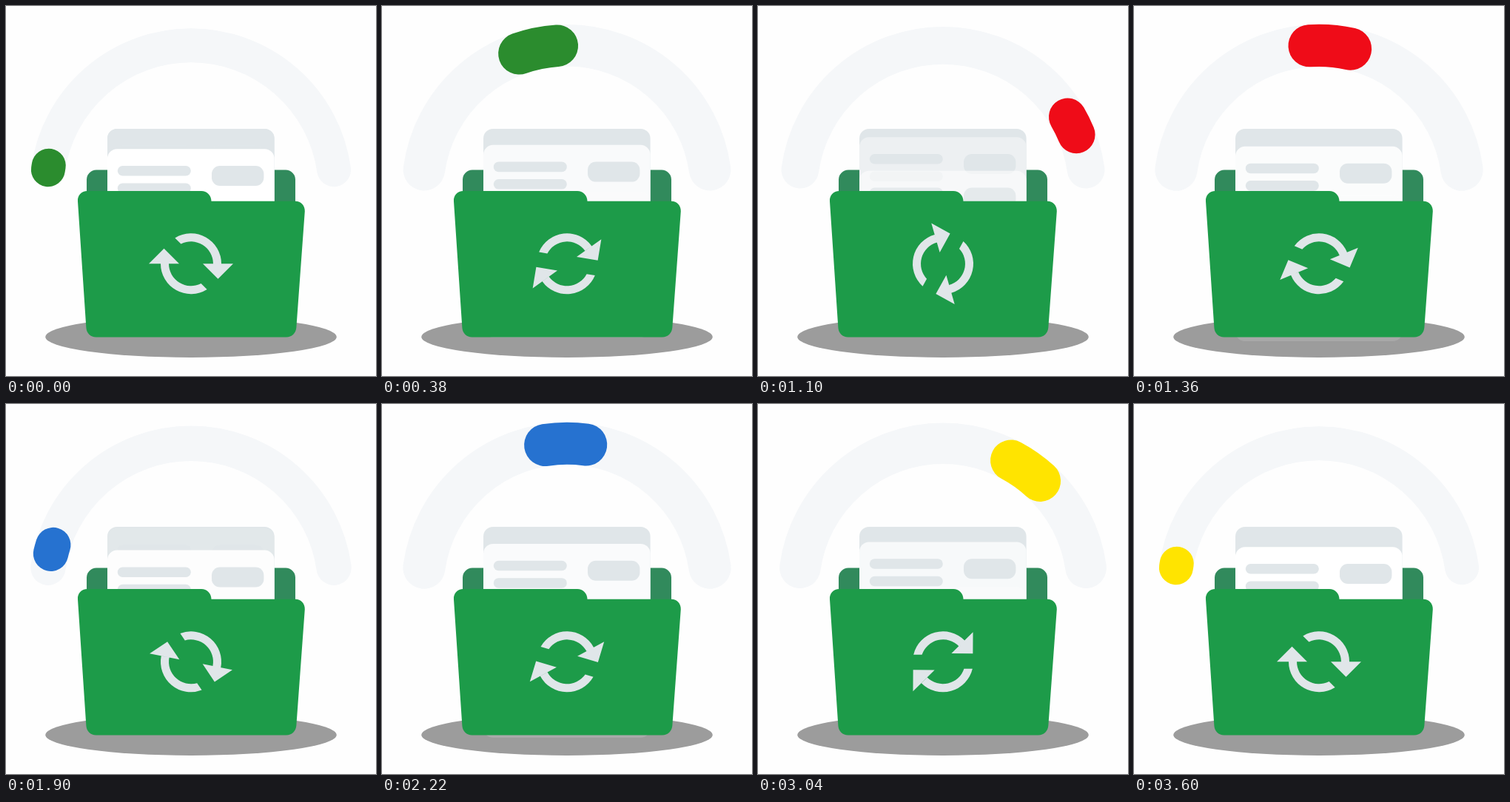
These frames come from a looping animation (500 by 500 pixels, 3.62 s). An HTML page:

```html
<!DOCTYPE html>
<html lang="en">
<head>
<meta charset="utf-8">
<title>Folder sync</title>
<style>
html, body { margin: 0; width: 100%; height: 100%; overflow: hidden; background: #fefefe; }
svg { display: block; width: 100vw; height: 100vh; }
</style>
</head>
<body>
<svg viewBox="0 0 500 500">
  <defs>
    <rect id="sheet" x="137" y="193.2" width="225.6" height="196.8" rx="13"/>
    <g id="lines" fill="#e0e6e9">
      <rect x="150.8" y="216" width="99" height="13.6" rx="6.8"/>
      <rect x="150.8" y="239.4" width="99" height="13.6" rx="6.8"/>
      <rect x="278" y="216" width="70.4" height="27" rx="11"/>
    </g>
    <path id="arrow" d="M-39.9-9.3A41 41 0 0 1 29-29L21.2-21.2A30 30 0 0 0-28.5-9.3ZM40.3-40.3V-11.3H11.3Z"/>
  </defs>
  <g fill="none" stroke-linecap="round">
    <path id="track" stroke="#f5f7f9"/>
    <path id="dash"/>
  </g>
  <ellipse cx="250" cy="447.2" rx="196.7" ry="27.7" fill="#9c9c9c"/>
  <rect x="109" y="221.6" width="282" height="200" rx="13" fill="#318a5c"/>
  <use href="#sheet" y="-27.2" fill="#e0e6e9"/>
  <g id="next"><use href="#sheet"/><use href="#lines"/></g>
  <g id="front"><use href="#sheet" fill="#fff"/><use href="#lines"/></g>
  <path fill="#1d9b49" d="M97 264C96.4 256 102 250 110 250H264C271.500 250 277.500 256 277.500 263.800H391C398.500 263.800 404.300 270 403.800 277.500L392.300 435C391.700 442 386 447.500 379 447.500H121.500C114.500 447.500 108.900 442 108.400 435Z"/>
  <g id="sync" fill="#e0e6e9">
    <use href="#arrow"/>
    <use href="#arrow" transform="rotate(180)"/>
  </g>
</svg>
<script>
const LOOP = 3620, SWING = 900, SPAN = 164;
const COLORS = ['#2b8c2e', '#ef0c18', '#2672d0', '#ffe400'];
const el = id => document.getElementById(id);
const [track, dash, next, front, sync] = ['track', 'dash', 'next', 'front', 'sync'].map(el);

const smooth = u => u * u * (3 - 2 * u);
const mix = (a, b, p) => Math.round(a + (b - a) * p);

// cubic-bezier(1/3, 0, 0, 1)
function swift(u) {
  let lo = 0, hi = 1;
  for (let i = 0; i < 24; i++) {
    const s = (lo + hi) / 2;
    if (s * (1 - s) ** 2 + s ** 3 < u) lo = s; else hi = s;
  }
  return smooth(hi);
}

// Point at a share of the arc, 0 = left end, 1 = right end
function point(share) {
  const a = (share - 0.5) * SPAN * Math.PI / 180;
  return `${(250 + 195 * Math.sin(a)).toFixed(3)} ${(248.3 - 195 * Math.cos(a)).toFixed(3)}`;
}
const arc = (from, to) => `M${point(from)}A195 195 0 0 1 ${point(to)}`;

track.setAttribute('d', arc(0, 1));

function draw(ms) {
  const t = ms % LOOP;
  const swing = Math.min(3, Math.floor(t / SWING));
  const u = Math.min(1, t / SWING - swing);

  const bump = smooth(1 - Math.abs(2 * u - 1));
  const start = 0.99 * smooth(swing % 2 ? 1 - u : u);
  const width = 46 + 11.3 * bump;
  track.setAttribute('stroke-width', width);
  dash.setAttribute('stroke-width', width);
  dash.setAttribute('stroke', COLORS[swing]);
  dash.setAttribute('d', arc(start, start + 0.01 + 0.09 * bump));

  const p = swift(u);
  next.setAttribute('transform', `translate(0 ${-27.2 * (1 - p)})`);
  next.setAttribute('fill', `rgb(${mix(224, 255, p)},${mix(230, 255, p)},${mix(233, 255, p)})`);
  front.setAttribute('transform', `translate(0 ${72 * p})`);
  front.setAttribute('opacity', 1 - p);
  sync.setAttribute('transform', `translate(250 348.3) rotate(${45 + 180 * p})`);
}

const begin = performance.now();
function tick() {
  draw(performance.now() - begin);
  requestAnimationFrame(tick);
}
tick();
</script>
</body>
</html>
```
